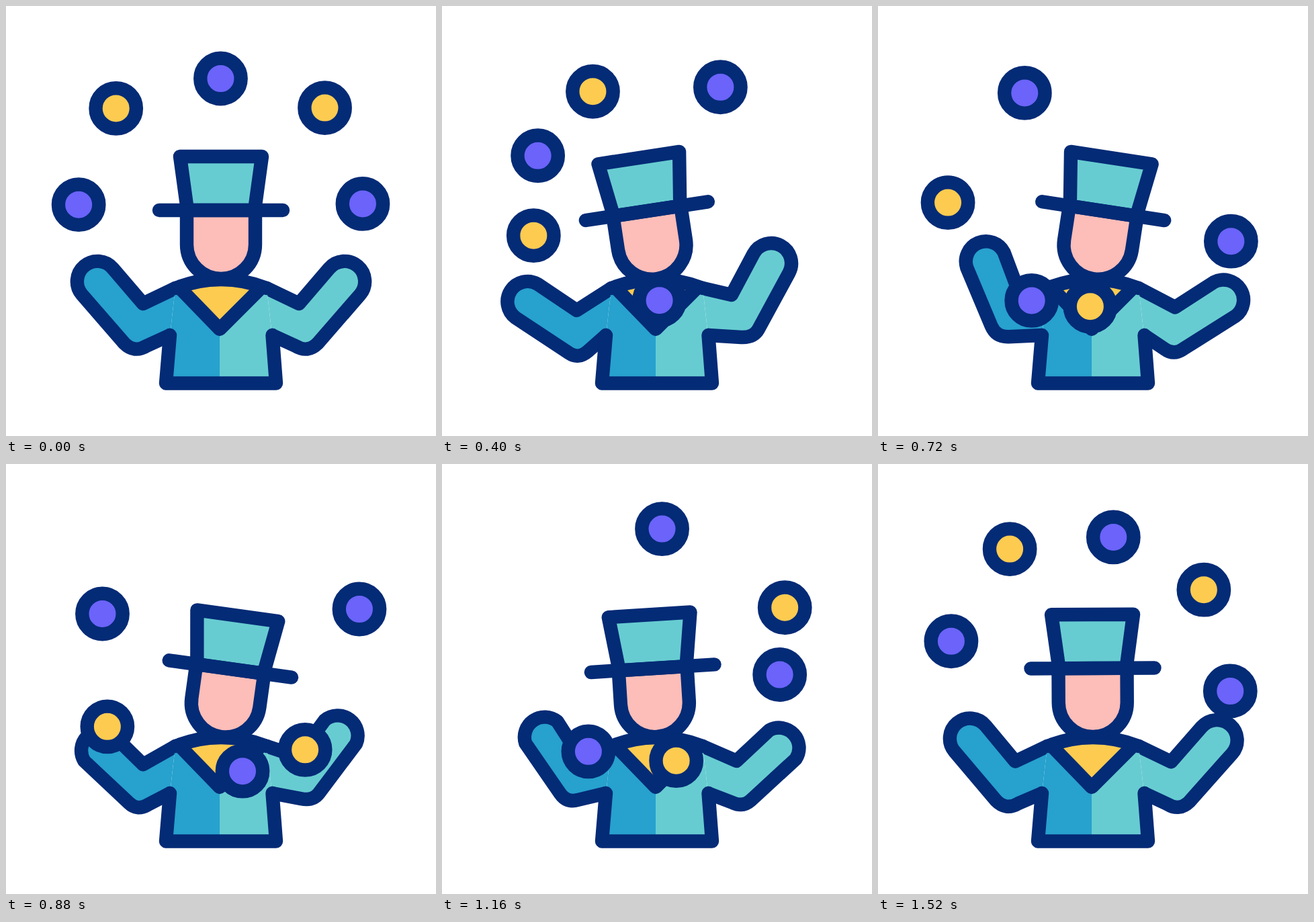
Write an HTML page without scripts that moves like this. It is 640 px wide and 640 px high and loops after 1560 ms.

```html
<!DOCTYPE html>
<html lang="en">
<head>
<meta charset="utf-8">
<title>Juggler</title>
<style>
  html, body { margin: 0; width: 100%; height: 100%; overflow: hidden; background: #fff; }
  svg { display: block; width: 100%; height: 100%; }
  .line { stroke: #042b76; stroke-width: 20.4; stroke-linecap: round; stroke-linejoin: round; fill: none; }
  .teal { fill: #67ccd1; }
  .blue { fill: #27a1ce; }
  .skin { fill: #fdbdb8; }
  .gold { fill: #fdcb50; }
  .violet { fill: #6b63fa; }
</style>
</head>
<body>
<svg viewBox="0 0 640 640">
  <!-- Head, swaying around the neck -->
  <g class="line">
    <path class="skin" d="M269 304V355a51 51 0 0 0 102 0V304"/>
    <path class="teal" d="M270 304L259 224H381L370 304Z"/>
    <path d="M228 304H412"/>
    <animateTransform attributeName="transform" type="rotate" dur="1.56s" repeatCount="indefinite"
      calcMode="spline" keyTimes="0;.2308;.4936;.8397;1"
      keySplines=".42 0 .58 1;.42 0 .58 1;.42 0 .58 1;.42 0 .58 1"
      values="0 320 405;-9 320 405;9.2 320 405;-6 320 405;0 320 405"/>
  </g>

  <!-- Arms: rest, one way, the other way, repeated -->
  <path class="line blue" d="M252 420L204 443L159 390.5A30 30 0 0 0 113 429.5L176 502Q191 517 209 506L244 490">
    <animate attributeName="d" dur="1.56s" repeatCount="indefinite"
      calcMode="spline" keyTimes="0;.2564;.4359;.641;.8205;1"
      keySplines=".42 0 .58 1;.42 0 .58 1;.42 0 .58 1;.42 0 .58 1;.42 0 .58 1"
      values="M252 420L204 443L159 390.5A30 30 0 0 0 113 429.5L176 502Q191 517 209 506L244 490;
              M252 420L200.5 453L142.5 414A30 30 0 0 0 109.5 464L189 516.5Q203 526 217 514L244 490;
              M252 420L213 433L189 365A30 30 0 0 0 133 387L168 475Q175 492 194 491.5L244 490;
              M252 420L200.5 453L142.5 414A30 30 0 0 0 109.5 464L189 516.5Q203 526 217 514L244 490;
              M252 420L213 433L189 365A30 30 0 0 0 133 387L168 475Q175 492 194 491.5L244 490;
              M252 420L204 443L159 390.5A30 30 0 0 0 113 429.5L176 502Q191 517 209 506L244 490"/>
  </path>
  <g transform="translate(640) scale(-1 1)">
    <path class="line teal" d="M252 420L204 443L159 390.5A30 30 0 0 0 113 429.5L176 502Q191 517 209 506L244 490">
      <animate attributeName="d" dur="1.56s" repeatCount="indefinite"
        calcMode="spline" keyTimes="0;.2564;.4359;.641;.8205;1"
        keySplines=".42 0 .58 1;.42 0 .58 1;.42 0 .58 1;.42 0 .58 1;.42 0 .58 1"
        values="M252 420L204 443L159 390.5A30 30 0 0 0 113 429.5L176 502Q191 517 209 506L244 490;
                M252 420L209 430L176.4 368.7A30 30 0 0 0 123.6 397.3L169 481Q176 494 195 493L244 490;
                M252 420L197.5 449L138.7 412.4A30 30 0 0 0 107.3 463.6L187 512Q201 521 214 511L244 490;
                M252 420L209 430L176.4 368.7A30 30 0 0 0 123.6 397.3L169 481Q176 494 195 493L244 490;
                M252 420L197.5 449L138.7 412.4A30 30 0 0 0 107.3 463.6L187 512Q201 521 214 511L244 490;
                M252 420L204 443L159 390.5A30 30 0 0 0 113 429.5L176 502Q191 517 209 506L244 490"/>
    </path>
  </g>

  <!-- Torso and collar -->
  <path class="blue" d="M252 420Q285 407 318 407V562H238L244 490Z"/>
  <path class="teal" d="M388 420Q355 407 318 407V562H402L396 490Z"/>
  <path class="gold" d="M258 418Q320 396 380 418L318 481Z"/>
  <g class="line">
    <path d="M244 490L238 561.5H402L396.5 490"/>
    <path d="M252 420Q285 407 320 407T388 420"/>
    <path d="M258 419L318 481L380 419"/>
  </g>

  <!-- Balls, each on its own loop of arcs -->
  <g class="line">
    <circle class="violet" r="30.2">
      <animateMotion dur="1.56s" repeatCount="indefinite" calcMode="linear"
        keyTimes="0;.1282;.2564;.4615;.641;.8205;.9744;1"
        keyPoints="0;.0916;.1826;.3532;.5341;.7394;.9624;1"
        path="M531 295A190 190 0 0 0 492 195A200 200 0 0 0 415 121A230 230 0 0 0 219 129A160 160 0 0 0 143 313A190 190 0 0 0 314 463A190 190 0 0 0 524 339A190 190 0 0 0 531 295"/>
    </circle>
    <circle class="gold" r="30.2">
      <animateMotion dur="1.56s" repeatCount="indefinite" calcMode="linear"
        keyTimes="0;.1282;.2564;.4615;.641;.8205;.9744;1"
        keyPoints="0;.1151;.2304;.413;.5777;.7722;.9681;1"
        path="M475 152A220 220 0 0 0 354 96A190 190 0 0 0 225 127A200 200 0 0 0 104 292A170 170 0 0 0 220 434A190 190 0 0 0 431 392A160 160 0 0 0 485 188A190 190 0 0 0 475 152"/>
    </circle>
    <circle class="violet" r="30.2">
      <animateMotion dur="1.56s" repeatCount="indefinite" calcMode="linear"
        keyTimes="0;.1282;.2564;.4615;.641;.8205;.9744;1"
        keyPoints="0;.0971;.1954;.4225;.617;.8097;.9728;1"
        path="M320 108A220 220 0 0 0 214 137A190 190 0 0 0 143 222A160 160 0 0 0 228 438A190 190 0 0 0 437 418A160 160 0 0 0 491 222A200 200 0 0 0 351 109A220 220 0 0 0 320 108"/>
    </circle>
    <circle class="gold" r="30.2">
      <animateMotion dur="1.56s" repeatCount="indefinite" calcMode="linear"
        keyTimes="0;.1282;.2564;.4615;.641;.8205;.9744;1"
        keyPoints="0;.0813;.1663;.3494;.5443;.7578;.965;1"
        path="M164 152A170 170 0 0 0 127 241A160 160 0 0 0 136 341A190 190 0 0 0 315 447A190 190 0 0 0 515 356A160 160 0 0 0 431 142A209 209 0 0 0 197 126A190 190 0 0 0 164 152"/>
    </circle>
    <circle class="violet" r="30.2">
      <animateMotion dur="1.56s" repeatCount="indefinite" calcMode="linear"
        keyTimes="0;.1282;.2564;.4615;.641;.8205;.9744;1"
        keyPoints="0;.1158;.231;.4221;.6195;.8178;.9739;1"
        path="M108 295A180 180 0 0 0 188 408A190 190 0 0 0 323 438A190 190 0 0 0 525 351A160 160 0 0 0 457 142A200 200 0 0 0 229 124A190 190 0 0 0 109 263A190 190 0 0 0 108 295"/>
    </circle>
  </g>
</svg>
</body>
</html>
```
